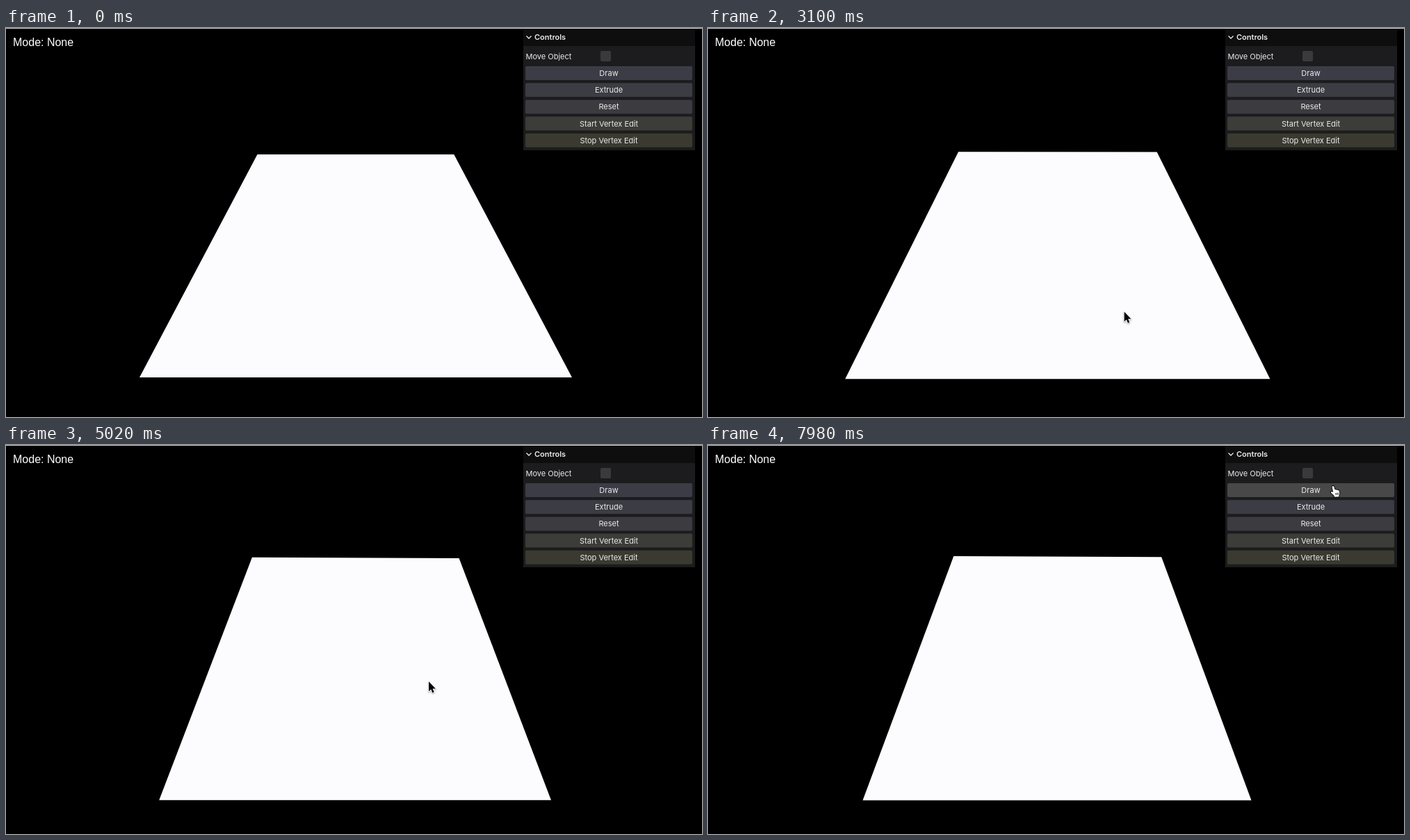
An HTML page with a canvas for the animation above (8000 ms loop, 1001 by 560 pixels).

```html
<!DOCTYPE html>
<html lang="en">
<head>
<meta charset="utf-8">
<title>Mesh editor</title>
<style>
html, body { margin: 0; width: 100%; height: 100%; overflow: hidden; background: #000; }
canvas { display: block; }
</style>
</head>
<body>
<canvas id="stage" width="1001" height="560"></canvas>
<script>
const ctx = document.getElementById('stage').getContext('2d');
const LOOP = 8000;
const UI_FONT = '11px Inter, "Liberation Sans", sans-serif';

// Spans in which the picture stands still.
const holds = [[420, 560], [1280, 1380], [1940, 2660], [3380, 3480], [3660, 3760], [4220, 4320],
  [5060, 5160], [5900, 6000], [6740, 6840], [7580, 7680]];

// Pointer stops: time, x, y.
const stops = [[800, 1012, 250], [1940, 598, 398.5], [2660, 598, 398.5], [3400, 599, 414],
  [4320, 599, 414], [5020, 608, 340.5], [5100, 610, 338], [5720, 907, 107], [6000, 907, 105],
  [6740, 903, 63], [6840, 903, 63], [7980, 899, 59.5]];

const buttons = [['Draw', '#3c3c46'], ['Extrude', '#3c3c44'], ['Reset', '#3c3c40'],
  ['Start Vertex Edit', '#3c3c38'], ['Stop Vertex Edit', '#3a3a30']];

const arrow = new Path2D('M0 0V14.2L3.2 11.2L5.3 16.2L7.7 15.2L5.6 10.3H9.9Z');
const hand = new Path2D('M4.2 9.5L2.6 2.2Q2.4 .4 4 .4Q5.2 .4 5.6 2L6.6 6Q7.8 5 8.6 6.3' +
  'Q10 5.4 10.8 6.8Q12.4 6.2 13 8Q13.8 12 12.4 14V16L6 16.3L5.6 14.6L1.2 10.6' +
  'Q.2 8.6 2 8.4Q3.2 8.6 4.2 9.5Z');
const knuckles = new Path2D('M7.6 10.5L8 13.5M9.5 10.3L9.8 13.3M11.3 10L11.4 13');

const mix = (a, b, k) => a + (b - a) * k;

function heldTime(t) {
  const hold = holds.find(([from, to]) => t >= from && t < to);
  return hold ? hold[0] : t;
}

// Orbit progress: the drag speeds up, then damping lets it run out.
function orbit(t) {
  if (t < 2660) return 0;
  if (t < 3380) return 0.369 * ((t - 2660) / 720) ** 1.56;
  return 1 - 0.631 * Math.exp((3380 - t) / 790);
}

function pointerAt(t) {
  const i = stops.findIndex(s => s[0] > t);
  if (i === 0) return null;
  if (i < 0) return stops.at(-1).slice(1);
  const [t0, x0, y0] = stops[i - 1], [t1, x1, y1] = stops[i];
  const k = (t - t0) / (t1 - t0), e = k * k * (3 - 2 * k);
  return [mix(x0, x1, e), mix(y0, y1, e)];
}

function box(x, y, w, h, color, radius = 0) {
  ctx.fillStyle = color;
  ctx.beginPath();
  ctx.roundRect(x, y, w, h, radius);
  ctx.fill();
}

function label(text, x, y, font, color = '#ebebeb', align = 'left') {
  ctx.font = font;
  ctx.fillStyle = color;
  ctx.textAlign = align;
  ctx.fillText(text, x, y);
}

function drawPlane(p) {
  const low = 503 + 8.5 * p * (1.6 - 0.6 * p);
  ctx.fillStyle = '#fcfcff';
  ctx.beginPath();
  ctx.moveTo(mix(361.5, 353.3, p), mix(182, 160, p));
  ctx.lineTo(mix(644.3, 652.2, p), mix(182, 161.3, p));
  ctx.lineTo(mix(814, 781.4, p), low);
  ctx.lineTo(mix(192, 222.6, p), low);
  ctx.fill();
}

function drawPanel(hovered) {
  box(744, 1, 247, 175, '#1c1c1e');
  box(744, 1, 247, 25, '#0e0e0e');
  ctx.strokeStyle = '#ebebeb';
  ctx.lineWidth = 1.3;
  ctx.stroke(new Path2D('M748.5 11.5L752 15L755.5 11.5'));
  label('Controls', 760, 17, '600 ' + UI_FONT);
  label('Move Object', 747.5, 44.5, UI_FONT);
  box(855, 33, 15, 15, '#3a3a3a', 2);
  buttons.forEach(([text, color], i) => {
    const y = 55 + 24.2 * i;
    box(747, y, 240, 20, i === hovered ? '#484848' : color, 2);
    label(text, 867, y + 14, UI_FONT, '#ebebeb', 'center');
  });
}

function drawPointer([x, y], overButton) {
  ctx.save();
  ctx.lineJoin = 'round';
  if (overButton) {
    ctx.translate(x - 4, y - 1);
    ctx.strokeStyle = '#000';
    ctx.lineWidth = 1.6;
    ctx.stroke(hand);
    ctx.fillStyle = '#fff';
    ctx.fill(hand);
    ctx.lineWidth = 0.8;
    ctx.stroke(knuckles);
  } else {
    ctx.translate(x, y);
    ctx.shadowColor = 'rgba(0,0,0,.35)';
    ctx.shadowBlur = 2;
    ctx.shadowOffsetY = 1;
    ctx.strokeStyle = '#fff';
    ctx.lineWidth = 2;
    ctx.stroke(arrow);
    ctx.shadowColor = 'transparent';
    ctx.fillStyle = '#000';
    ctx.fill(arrow);
  }
  ctx.restore();
}

function draw(now) {
  const t = heldTime(now % LOOP);
  const pointer = pointerAt(t);
  const hovered = pointer && pointer[0] >= 747 && pointer[0] <= 987
    ? buttons.findIndex((_, i) => Math.abs(pointer[1] - 65 - 24.2 * i) <= 10) : -1;
  box(0, 0, 1001, 560, '#000');
  box(0, 0, 1001, 1, '#d0d0d0');
  drawPlane(orbit(t));
  label('Mode: None', 10, 26, '16px "Liberation Sans", Arial, sans-serif', '#fff');
  drawPanel(hovered);
  if (pointer) drawPointer(pointer, hovered >= 0);
}

const start = performance.now();
function tick() {
  draw(performance.now() - start);
  requestAnimationFrame(tick);
}
tick();
</script>
</body>
</html>
```
